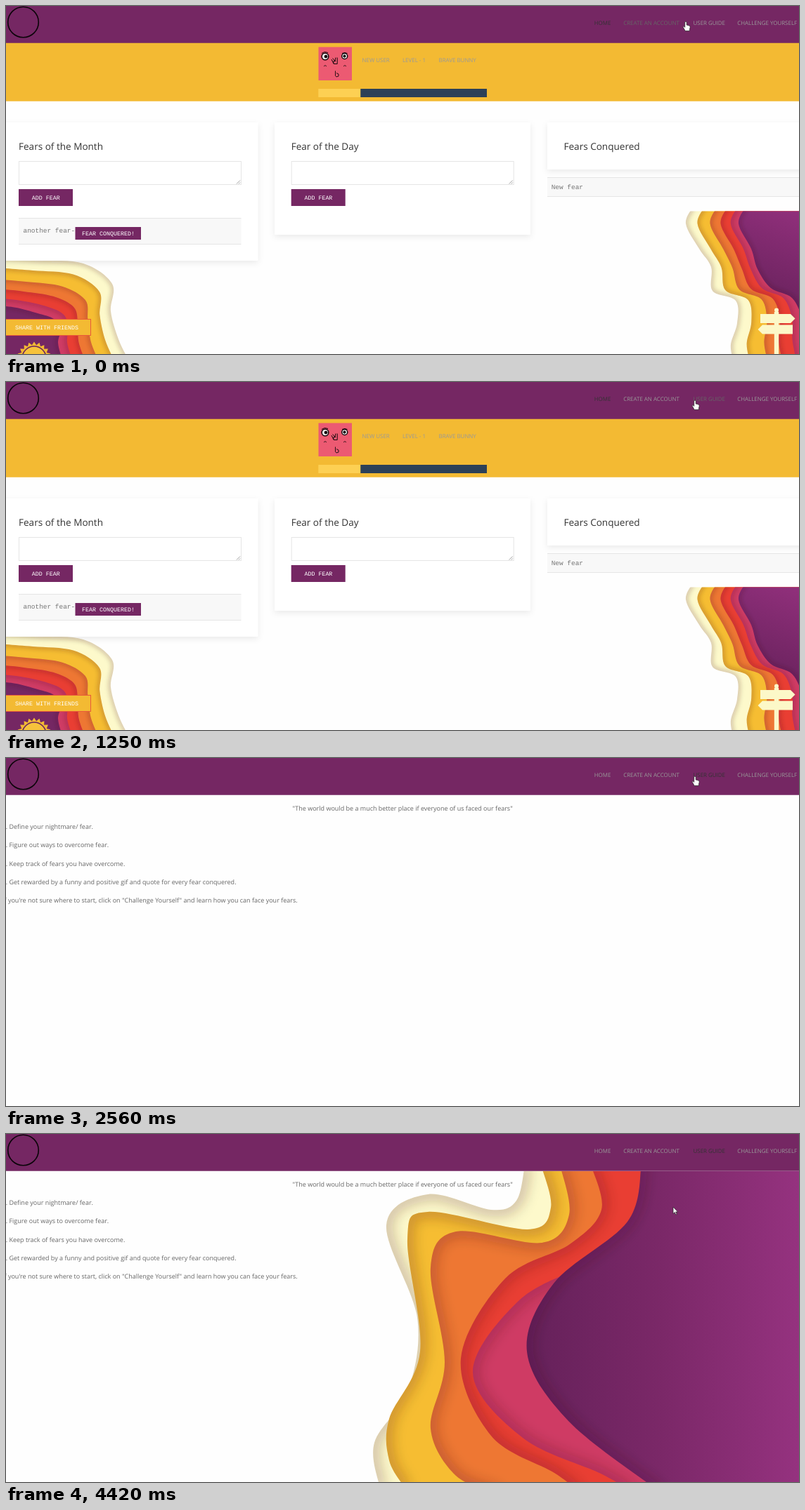
An HTML page for the animation above (4.5 s loop, 1128x496 px).

```html
<!DOCTYPE html>
<html lang="en">
<head>
<meta charset="utf-8">
<title>Fear tracker</title>
<style>
  html, body { margin: 0; width: 100%; height: 100%; overflow: hidden; background: #fefefe; }
  svg { display: block; width: 1128px; height: 496px; }
  text { font-family: "Open Sans", "Noto Sans", sans-serif; text-rendering: geometricPrecision; }
  .nav { font-size: 7.95px; fill: #999; }
  .head { font-size: 13.55px; fill: #333; }
  .body { font-size: 9px; fill: #666; }
  .mono { font-family: "Liberation Mono", monospace; font-size: 9.45px; fill: #777; }
  .label { font-family: "Liberation Mono", monospace; font-size: 8.33px; fill: #fff; }
  .btn { fill: #752763; }
  .card { fill: #fff; filter: drop-shadow(0 3px 4.5px rgba(0, 0, 0, .08)); }
  .row { fill: #f8f8f8; }
  .rule { stroke: #e5e5e5; fill: none; }
  .shade { fill: none; stroke: #3a0d20; stroke-opacity: .24; }
</style>
</head>
<body>
<svg viewBox="0 0 1128 496">
  <defs>
    <linearGradient id="plum" gradientUnits="userSpaceOnUse" x1="740" x2="1128" y1="0" y2="0">
      <stop offset="0" stop-color="#65215a"/><stop offset=".5" stop-color="#7b2868"/><stop offset="1" stop-color="#95327f"/>
    </linearGradient>
    <linearGradient id="plumSmall" gradientUnits="userSpaceOnUse" x1="1060" x2="1110" y1="430" y2="292">
      <stop offset="0" stop-color="#65215a"/><stop offset="1" stop-color="#8f2f7a"/>
    </linearGradient>
    <filter id="blurBig" filterUnits="userSpaceOnUse" x="-50" y="-50" width="1250" height="620"><feGaussianBlur stdDeviation="9"/></filter>
    <filter id="blurSmall" filterUnits="userSpaceOnUse" x="-50" y="-50" width="1250" height="620"><feGaussianBlur stdDeviation="3"/></filter>
    <clipPath id="below"><path d="M0 53H1128V496H0Z"/></clipPath>
    <clipPath id="corner"><path d="M900 292.500H1128V496H900Z"/></clipPath>
  </defs>

  <g id="home">
    <g id="artLeft"></g>
    <g id="artRight" clip-path="url(#corner)"></g>
    <g fill="#fcf8c8">
      <circle cx="1096" cy="433.500" r="3"/>
      <path d="M1092.800 436h6.400v60h-6.400z"/>
      <path d="M1073 439h43l6.500 6.500-6.500 6.500h-43z"/>
      <path d="M1119 454.500h-43l-6.500 6.500 6.500 6.500h43z"/>
    </g>
    <path id="sun" fill="#f3ba33"/>
    <circle cx="40" cy="502" r="17" fill="#f6c23c" stroke="#6b2460" stroke-width="1.600"/>
    <rect x="-2" y="446.500" width="122.500" height="23" fill="#f3ba33" stroke="#e85a3a"/>
    <text class="label" x="13" y="461">SHARE WITH FRIENDS</text>

    <path fill="#f3ba33" d="M0 52H1128V135.700H0Z"/>
    <path fill="#ec5a72" d="M444.500 58.500h47.500v47.500h-47.500z"/>
    <g fill="none" stroke="#16080c">
      <circle cx="454" cy="72" r="4.800" fill="#fff" stroke-width="1.600"/>
      <circle cx="481.700" cy="71.500" r="4" fill="#fff" stroke-width="1.500"/>
      <circle cx="455" cy="72" r="2" fill="#16080c"/>
      <circle cx="481.500" cy="71.500" r="1.700" fill="#16080c"/>
      <path d="M449 67.500q4-3.500 9-1M478 67.500q4-2 7.500 0"/>
      <path d="M463 76l3.200 6.500h5V73.500M464.500 74.500l3.500 3.500 1-4.500M466 82v-3.500h3"/>
      <path d="M452 86l2-1.500 2 1.500M480 86l2-1.500 2 1.500" stroke-width=".8"/>
      <path d="M468.500 92.500v7l1.500 1.500 3-1v-3l-3-1.500" stroke-width=".9"/>
    </g>
    <text class="nav" x="506.500" y="80">NEW USER</text>
    <text class="nav" x="564" y="80">LEVEL - 1</text>
    <text class="nav" x="615.500" y="80">BRAVE BUNNY</text>
    <path fill="#fdd053" d="M444.300 118h60v12h-60z"/>
    <path fill="#2c4057" d="M504.300 118h179.700v12h-179.700z"/>

    <path class="card" d="M-6 166H358.500V363H-6Z"/>
    <path class="card" d="M382 166H746V326H382Z"/>
    <path class="card" d="M770 166H1134V233H770Z"/>
    <text class="head" x="18" y="204.700">Fears of the Month</text>
    <text class="head" x="405.700" y="204.700">Fear of the Day</text>
    <text class="head" x="793.500" y="204.700">Fears Conquered</text>
    <g id="forms"></g>

    <path class="row" d="M18 303H334.500V339H18Z"/>
    <path class="rule" d="M18 302.500H334.500M18 339.500H334.500"/>
    <text class="mono" x="24.500" y="323">another fear-</text>
    <path class="btn" d="M98.500 315H192V333H98.500Z"/>
    <text class="label" x="108" y="326.700">FEAR CONQUERED!</text>
    <path class="row" d="M770 244H1128V272H770Z"/>
    <path class="rule" d="M770 244.500H1128M770 271.500H1128"/>
    <text class="mono" x="775.700" y="261">New fear</text>
  </g>

  <g id="guide">
    <g id="artGuide" clip-path="url(#below)"></g>
    <text class="body" x="407.500" y="75.200">"The world would be a much better place if everyone of us faced our fears"</text>
  </g>

  <path fill="#752763" d="M0 0H1128V52.700H0Z"/>
  <circle cx="24.500" cy="23" r="21.800" fill="none" stroke="#0b0409" stroke-width="1.600"/>
  <text class="nav" id="navHome" x="836.700" y="26.500">HOME</text>
  <text class="nav" id="navAccount" x="878.200" y="26.500">CREATE AN ACCOUNT</text>
  <text class="nav" id="navGuide" x="977.500" y="26.500">USER GUIDE</text>
  <text class="nav" x="1040.200" y="26.500">CHALLENGE YOURSELF</text>

  <g id="cursor" fill="#fff" stroke="#222" stroke-width=".7" stroke-linejoin="round">
    <path id="hand" d="M-1.300 1Q0-.8 1.200 1V5l3.600 1q1.600.6 1.400 2.200l-.8 3.300v2H-.8L-3.600 8.600q-.6-1.600.6-1.800l1.700 1.600z"/>
    <path id="arrow" d="M0 0V9.500L2.200 7.500 3.800 11 5.200 10.400 3.700 7H6.600Z"/>
  </g>
</svg>
<script>
const LOOP = 4500, OPEN = 2560, ART = 3100, LEAVE = 4340;
const COLORS = ["#fdf9cb", "#f6bd32", "#ee7733", "#e93e33", "#cf3b64"];
const $ = id => document.getElementById(id);
const mix = (a, b, f) => a + (b - a) * f;
const clamp = (v, lo, hi) => Math.max(lo, Math.min(hi, v));

function add(parent, tag, attrs, text = "") {
  const el = document.createElementNS("http://www.w3.org/2000/svg", tag);
  for (const key in attrs) el.setAttribute(key, attrs[key]);
  el.textContent = text;
  return parent.appendChild(el);
}

const points = text => text.split(" ").map(s => s.split(",").map(Number));

// Smooth curve through points (Catmull-Rom as Beziers)
function curve(p) {
  const at = i => p[clamp(i, 0, p.length - 1)];
  let d = "M" + p[0];
  for (let i = 0; i < p.length - 1; i++) {
    const [a, b, c, e] = [at(i - 1), at(i), at(i + 1), at(i + 2)];
    const c1 = b.map((v, k) => v + (c[k] - a[k]) / 6);
    const c2 = c.map((v, k) => v - (e[k] - b[k]) / 6);
    d += `C${c1} ${c2} ${c}`;
  }
  return d;
}

// Paper layers from the outside in, each with a soft shadow inside its edge
function paper(name, edges, close, plum, blur, width) {
  edges.forEach((edge, i) => {
    const line = curve(edge), d = line + close + "Z", id = name + i;
    add(add($(name), "clipPath", { id }), "path", { d });
    add($(name), "path", { d, fill: COLORS[i] || plum });
    const cut = add($(name), "g", { "clip-path": `url(#${id})` });
    add(cut, "path", { d: line, class: "shade", "stroke-width": width, filter: `url(#${blur})` });
  });
}

// In-between edges blended from the outermost and innermost ones
function blend(outer, inner) {
  const [a, b] = [points(outer), points(inner)];
  return [0, .22, .46, .66, .85, 1].map(f => a.map((p, i) => p.map((v, k) => mix(v, b[i][k], f))));
}

paper("artGuide", [
  "738,44 726,95 690,108 600,86 541,130 585,262 572,365 524,440 532,505",
  "761,44 775,105 742,136 600,111 571,150 589,310 545,406 545,465 568,505",
  "788,44 801,115 762,155 640,139 604,190 624,325 604,420 640,487 700,512",
  "832,44 847,108 802,157 710,206 647,320 690,430 780,483 815,510",
  "820,190 730,237 664,340 735,433 846,484 890,510",
  "904,44 884,125 779,213 741,310 800,409 930,510",
].map(points), "L1150 520V30", "url(#plum)", "blurBig", 18);

paper("artRight", blend(
  "979,284 967,310 986,346 1003,372 1005,406 1038,420 1040,452 1031,482 1034,504",
  "1054,284 1042,310 1060,346 1069,375 1088,402 1118,416 1132,445 1134,475 1140,504",
), "L1150 520V270", "url(#plumSmall)", "blurSmall", 6);

paper("artLeft", blend(
  "-10,358 45,362 110,367 151,396 149,435 160,475 174,504",
  "-10,427 15,430 45,438 68,446 78,460 74,480 80,504",
), "L-20 520V350", "#752763", "blurSmall", 6);

const rays = Array.from({ length: 40 }, (_, i) => {
  const r = i % 2 ? 20 : 24.5, a = i * Math.PI / 20 - Math.PI / 2;
  return [40 + r * Math.cos(a), 503 + r * Math.sin(a)];
});
$("sun").setAttribute("d", `M${rays.join("L")}Z`);

for (const x of [18, 405.7]) {
  const f = $("forms");
  add(f, "rect", { x: x + .5, y: 221.5, width: 316, height: 33, fill: "#fff", stroke: "#e5e5e5" });
  add(f, "path", { d: `M${x + 310} 253.5l5-5m-2 5l2-2`, stroke: "#777", "stroke-width": .7 });
  add(f, "rect", { x, y: 261, width: 77, height: 24, class: "btn" });
  add(f, "text", { x: x + 18.7, y: 276, class: "label" }, "ADD FEAR");
}

[
  ". Define your nightmare/ fear.",
  ". Figure out ways to overcome fear.",
  ". Keep track of fears you have overcome.",
  ". Get rewarded by a funny and positive gif and quote for every fear conquered.",
  "If you're not sure where to start, click on \"Challenge Yourself\" and learn how you can face your fears.",
].forEach((line, i) => {
  add($("guide"), "text", { class: "body", x: line[0] === "." ? -.3 : -5, y: 101.3 + 26.1 * i }, line);
});

// Cursor stops, and the moves between them in even steps
const STOPS = points("967,22 980,19 980,26 949,104");
const MOVES = [
  { start: 80, end: 540, steps: 7 },
  { start: 860, end: 1250, steps: 6 },
  { start: LEAVE, end: 4420, steps: 2 },
];

function cursorAt(t) {
  let pos = STOPS[0];
  MOVES.forEach(({ start, end, steps }, i) => {
    if (t < start) return;
    const step = Math.floor((t - start) / (end - start) * (steps - 1) + 1e-6) + 1;
    const f = Math.min(1, step / steps);
    pos = STOPS[i].map((v, k) => mix(v, STOPS[i + 1][k], f));
  });
  return pos;
}

function show(id, on) { $(id).style.display = on ? "" : "none"; }
function grey(id, v) { $(id).style.fill = `rgb(${v},${v},${v})`; }

function draw(t) {
  const open = t >= OPEN;
  const hover = clamp((t - 130) / 120, 0, 1);
  show("home", !open);
  show("guide", open);
  show("artGuide", t >= ART);
  grey("navHome", open ? 153 : 51);
  grey("navAccount", mix(102, 153, hover));
  grey("navGuide", open ? 51 : mix(153, 102, hover));
  show("hand", t < LEAVE);
  show("arrow", t >= LEAVE);
  $("cursor").setAttribute("transform", `translate(${cursorAt(t)})`);
}

const began = performance.now();
function tick() {
  draw((performance.now() - began) % LOOP);
  requestAnimationFrame(tick);
}
tick();
</script>
</body>
</html>
```
